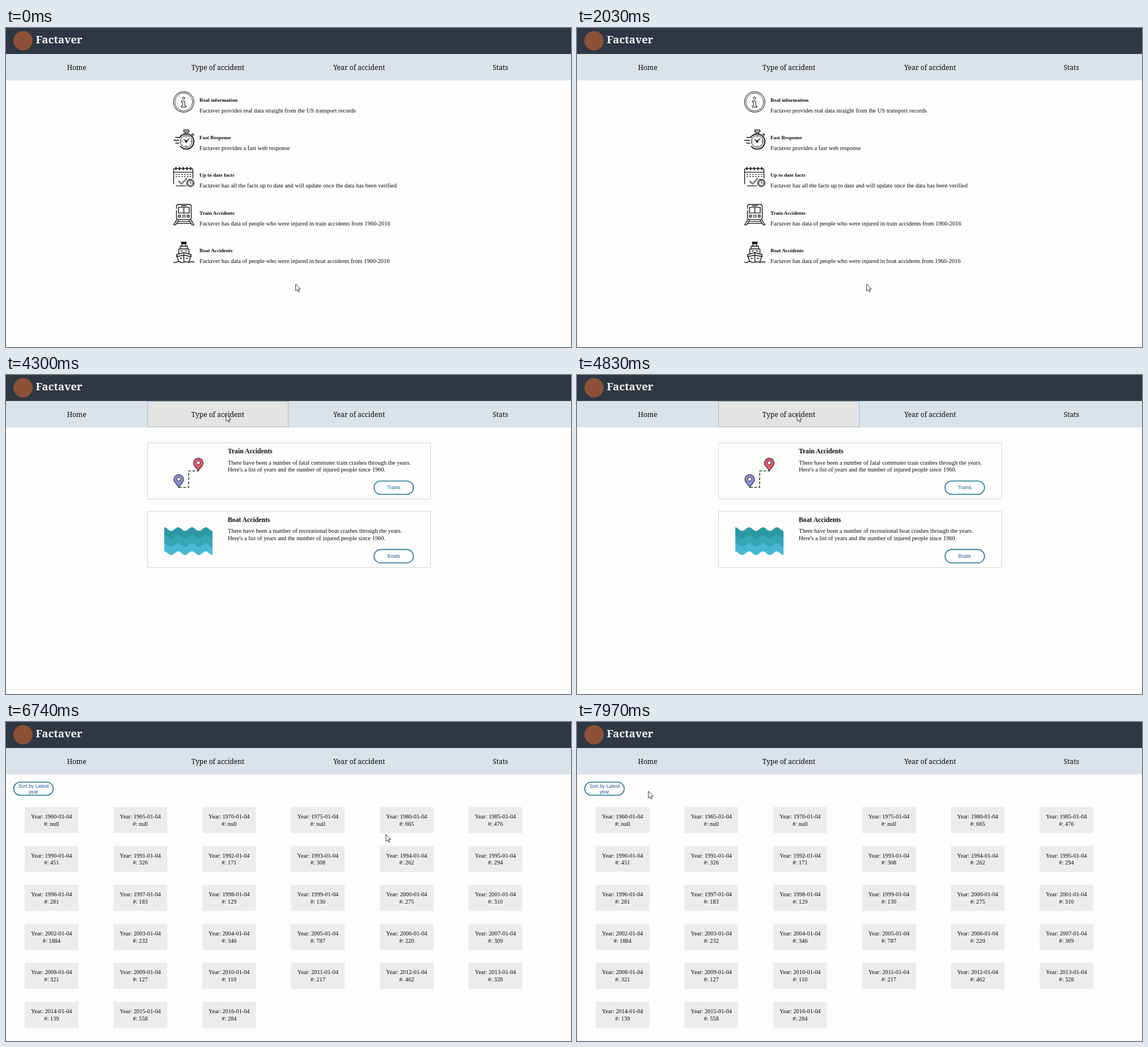
Write an HTML page that moves like this. It is 996x562 px and loops after 8000 ms.

```html
<!DOCTYPE html>
<html lang="en">
<head>
<meta charset="utf-8">
<title>Accident data</title>
<style>
  html, body { margin: 0; width: 100%; height: 100%; overflow: hidden; background: #fdfdfc; }
  svg { display: block; width: 100%; height: 100%; }
  text { font: 10.5px "Liberation Serif", "Times New Roman", serif; fill: #0c0c0c; }
  .title { font: bold 18.6px "Noto Serif", serif; fill: #fff; }
  .nav { font: 12px "Noto Serif", serif; }
  .label { font-size: 9.2px; font-weight: bold; }
  .heading { font-size: 11.7px; font-weight: bold; }
  .year { font-size: 10.3px; }
  .button { font: 8.75px "Liberation Sans", Arial, sans-serif; fill: #235f9c; }
  .mid { text-anchor: middle; }
  .icon { fill: none; stroke: #161616; stroke-width: 1.4; stroke-linecap: round; stroke-linejoin: round; }
  .thin { stroke-width: 1; }
</style>
</head>
<body>
<svg id="stage" viewBox="0 0 996 562" xmlns="http://www.w3.org/2000/svg"></svg>
<script>
const LOOP = 8000, TO_TYPES = 4200, TO_YEARS = 6450;
const brand = 'Factaver';

const text = (x, y, content, cls = '') => `<text x="${x}" y="${y}" class="${cls}">${content}</text>`;
const rect = (x, y, w, h, attrs) => `<rect x="${x}" y="${y}" width="${w}" height="${h}" ${attrs}/>`;
const circle = (x, y, r, attrs = '') => `<circle cx="${x}" cy="${y}" r="${r}" ${attrs}/>`;
const path = (d, attrs = '') => `<path d="${d}" ${attrs}/>`;
const group = (x, y, content, attrs = '') => `<g transform="translate(${x} ${y})" ${attrs}>${content}</g>`;
const pill = (x, y, w, h) => rect(x, y, w, h, `rx="${h / 2}" fill="#fdfdfd" stroke="#1c7590" stroke-width="1.6"`);

// Header and navigation
const tabs = ['Home', 'Type of accident', 'Year of accident', 'Stats'];
const header =
  rect(0, 0, 996, 46, 'fill="#2e3744"') +
  circle(30, 22.5, 17, 'fill="#8c5136"') +
  text(52.5, 27.3, brand, 'title') +
  rect(0, 45.8, 996, 46.5, 'fill="#dae2ec"') +
  rect(249, 46, 249, 46, 'id="hover" fill="#e4e4e3"') +
  rect(249.5, 46.5, 248, 45, 'id="focus" fill="none" stroke="#a3bcc2"') +
  tabs.map((name, i) => text(124.5 + 249 * i, 74, name, 'nav mid')).join('');

// Home page: 38 px icons beside a label and a sentence
const infoIcon =
  circle(19.3, 19.3, 18, 'stroke="#3a3a3a" stroke-width="1.2"') +
  circle(19.3, 19.3, 15.6, 'stroke="#3a3a3a" class="thin"') +
  circle(19, 12.5, 2, 'class="thin"') +
  path('M15.5 17.5H21V26H23.3V28.6H15V26H17.3V20H15.5Z', 'class="thin"');
const watchIcon =
  path('M12.4 15.5A13.4 13.4 0 1 1 13.5 31.3', 'stroke-width="1.9"') +
  circle(23.8, 22.5, 10.4, 'class="thin"') +
  path('M19.5 2.5H28.5V5.8H19.5ZM22 6V9M26 6V9M33 10.5L35 9L36.7 11L35 12.5') +
  path('M19.5 19L23.5 22.5L28.5 18M5 15.5H12M1.5 20.5H10.5M5 25.5H11') +
  path('M23.8 13.5V15M23.8 30V31.5M15 22.5H16.3M31.5 22.5H32.8', 'class="thin"') +
  circle(23.6, 22.5, 1.5);
const calendarIcon =
  path('M23 34.5H6M1.5 31V6Q1.5 4 3.5 4H33.5Q35.5 4 35.5 6V21M1.5 10.5H35.5') +
  [5.5, 12, 18.5, 25, 31.5].map(x => path(`M${x} 2.2V6`, 'stroke-width="2.2"')).join('') +
  path('M5 14.5H33M5 18H33', 'stroke-width="1.2" stroke-dasharray="2.6 2.4" stroke-linecap="butt"') +
  path('M11 26L15.5 30L24 20.5L25 22L15.8 32L10.5 27.5Z', 'class="thin"') +
  circle(31, 29.5, 6.4) + circle(31, 29.5, 4.4, 'class="thin"') + path('M31 26.8V29.5H33', 'class="thin"');
const trainIcon =
  path('M6.5 8V4.5Q6.5 .8 10.5 .8H28.5Q32.5 .8 32.5 4.5V24Q32.5 27.5 29 27.5H10Q6.5 27.5 6.5 24V12') +
  path('M10 6H29V16H10ZM19.5 6V16M15 3.4H24') +
  circle(11.7, 21.5, 1.9) + circle(27.3, 21.5, 1.9) +
  path('M16.5 20H22.5M16.5 23H22.5M7 28L1.5 37H5L10 29M32 28L37.5 37H34L29 29M10 31H29M8 34.5H31');
const boatIcon =
  path('M15 1H24L23 4H16Z', 'fill="#161616"') +
  path('M16 4V8H23V4M13 8.3H26V13H13ZM10.5 13.2H28.5V21M10.5 13.2V21') +
  path('M14 16.5H17M22 16.5H25M19.5 21V35M19.5 19.5L6.5 23L10.5 35.5M19.5 19.5L32.5 23L28.5 35.5M6.5 26.5L19.5 24L32.5 26.5') +
  path('M12.5 29.5H15.5M23.5 29.5H26.5') +
  path('M1.5 36.5Q4.5 38 7.5 36T13.5 36T19.5 36.5T25.5 36T31.5 36T37.5 36.5');

const facts = [
  [infoIcon, 'Real information', 'provides real data straight from the US transport records'],
  [watchIcon, 'Fast Response', 'provides a fast web response'],
  [calendarIcon, 'Up to date facts', 'has all the facts up to date and will update once the data has been verified'],
  [trainIcon, 'Train Accidents', 'has data of people who were injured in train accidents from 1960-2016'],
  [boatIcon, 'Boat Accidents', 'has data of people who were injured in boat accidents from 1960-2016']
];
const homePage = facts.map(([icon, label, sentence], i) => group(294, 111 + 66.3 * i,
  `<g class="icon">${icon}</g>` + text(47, 18.7, label, 'label') + text(47, 37.8, `${brand} ${sentence}`))).join('');

// Accident types page
const pin = (x, y, color) => group(x, y,
  path('M0 13C-3 7-8.5 4.5-8.5-1A8.5 8.5 0 0 1 8.5-1C8.5 4.5 3 7 0 13Z', `fill="${color}" stroke="#4a4754" stroke-width="1.5"`) +
  circle(0, -1.5, 3.3, 'fill="#fff" stroke="#4a4754" stroke-width="1.3"'));
const route =
  path('M305 198H322V169H339', 'fill="none" stroke="#444" stroke-width="1.7" stroke-dasharray="5 2.5"') +
  pin(304.5, 185, '#8a92dc') + pin(339, 156, '#ee5766');

const waveLine = y => Array.from({ length: 86 }, (_, x) =>
  `${279 + x} ${(y - 3.2 * Math.cos(x * 2 * Math.PI / 24.4)).toFixed(2)}`);
const band = (top, bottom, color) =>
  path('M' + [...waveLine(top), ...waveLine(bottom).reverse()].join('L') + 'Z', `fill="${color}"`);
const sea = band(271.5, 300, '#2c98a4') + band(285, 308, '#36a5b4') + band(299.5, 314, '#48b8d6');

const typeCard = (y, kind, crashes) => group(0, y,
  rect(249.5, .5, 499, 99, 'fill="none" stroke="#d3d4d8"') +
  text(391, 19, `${kind} Accidents`, 'heading') +
  text(391, 38.5, `There have been a number of ${crashes} crashes through the years.`) +
  text(391, 51.2, "Here's a list of years and the number of injured people since 1960.") +
  pill(648.8, 67.7, 69.5, 23.6) + text(683.5, 82.2, `${kind}s`, 'button mid'));
const typesPage =
  typeCard(119, 'Train', 'fatal commuter train') + route +
  typeCard(239.7, 'Boat', 'recreational boat') + sea;

// Yearly counts page
const counts = [null, null, null, null, 665, 476, 451, 326, 171, 308, 262, 294, 281, 183, 129, 130, 275, 310,
  1884, 232, 346, 787, 220, 309, 321, 127, 110, 217, 462, 328, 139, 558, 284];
const yearCard = (count, i) => {
  const year = i < 7 ? 1960 + 5 * i : 1984 + i;
  return group(33 + 156.5 * (i % 6), 149.7 + 68.6 * Math.floor(i / 6),
    rect(0, 0, 94.7, 46, 'fill="#ececeb"') +
    text(47.3, 20.4, `Year: ${year}-01-04`, 'year mid') + text(47.3, 33, `#: ${count}`, 'year mid'));
};
const yearsPage =
  pill(13.6, 106, 69.6, 23) +
  text(48.5, 115.6, 'Sort by Latest', 'button mid') + text(48.5, 125.7, 'year', 'button mid') +
  counts.map(yearCard).join('');

const arrow = path('M0 0V12.2L2.8 9.6L4.8 13.8L6.6 13L4.8 8.9H8.5Z',
  'id="cursor" fill="#fff" stroke="#22222c" stroke-width=".9"');

const stage = document.getElementById('stage');
const pages = [homePage, typesPage, yearsPage];
stage.innerHTML = header + pages.map(page => `<g class="page">${page}</g>`).join('') + arrow;
const pageNodes = stage.querySelectorAll('.page');
const [hover, focus, cursor] = ['hover', 'focus', 'cursor'].map(id => document.getElementById(id));

// Cursor track: time, x, y
const track = [
  [0, 510.6, 451], [2200, 510.6, 451], [2500, 500, 548], [3000, 455, 385], [3370, 410.3, 115.5],
  [3600, 390, 69.5], [3900, 388, 69.3], [4900, 388, 69.3], [5500, 645, 178], [5800, 664.2, 187.5],
  [6000, 669.7, 198], [7150, 669.7, 198], [7970, 126.5, 122], [8000, 113, 120.5]
];

// Slope at a track point, flat where the direction turns or rests
function slope(i, axis) {
  const a = track[i - 1], b = track[i], c = track[i + 1];
  if (!a || !c || (b[axis] - a[axis]) * (c[axis] - b[axis]) <= 0) return 0;
  return (c[axis] - a[axis]) / (c[0] - a[0]);
}

function cursorAt(time) {
  const i = track.findIndex(point => point[0] > time) - 1;
  const a = track[i], b = track[i + 1], span = b[0] - a[0], u = (time - a[0]) / span;
  const ease = u * u * (3 - 2 * u);
  return [1, 2].map(axis => a[axis] + (b[axis] - a[axis]) * ease +
    span * u * (1 - u) * ((1 - u) * slope(i, axis) - u * slope(i + 1, axis)));
}

const show = (node, visible) => { node.style.display = visible ? '' : 'none'; };

function draw() {
  const time = performance.now() % LOOP;
  const current = time < TO_TYPES ? 0 : time < TO_YEARS ? 1 : 2;
  const [x, y] = cursorAt(time);
  pageNodes.forEach((node, i) => show(node, i === current));
  show(hover, x > 249 && x < 498 && y > 46 && y < 92);
  show(focus, current === 1);
  cursor.setAttribute('transform', `translate(${x.toFixed(2)} ${y.toFixed(2)})`);
  requestAnimationFrame(draw);
}
draw();
</script>
</body>
</html>
```
